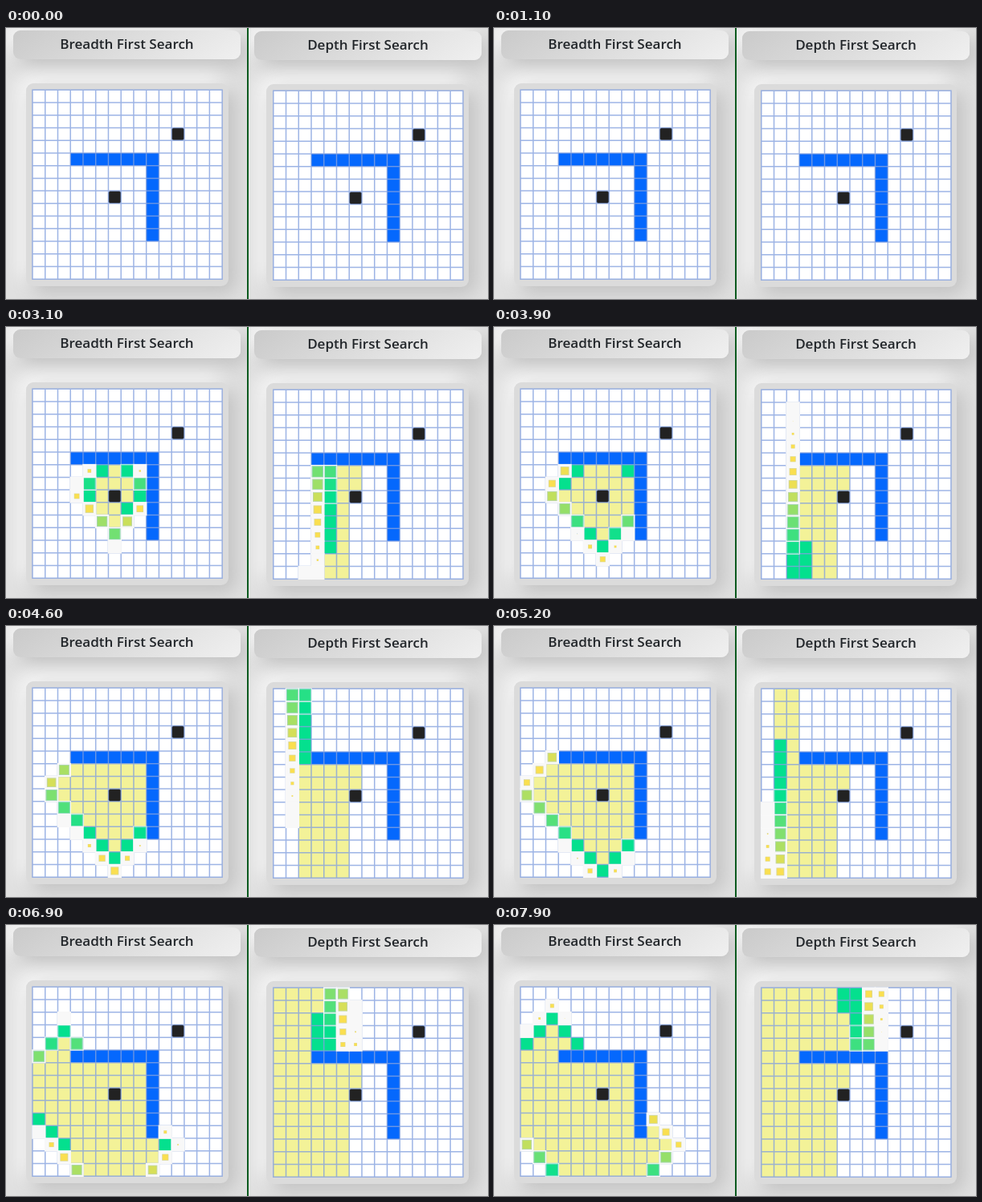
Write an HTML page with a canvas that moves like this. It is 600 px wide and 338 px high and loops after 8 s.

```html
<!DOCTYPE html>
<html lang="en">
<head>
<meta charset="utf-8">
<title>Breadth first and depth first search</title>
<style>
  html, body { margin: 0; width: 100%; height: 100%; overflow: hidden; }
  body { position: relative; background: #0b5a1e; }
  .panel { position: absolute; top: 0; height: 338px; overflow: hidden; background: #e0e0e0; }
  #left { left: 0; width: 300px; }
  #right { left: 302px; width: 298px; }
  h1, .board {
    position: absolute; margin: 0; border-radius: 9px;
    box-shadow: 8px 8px 24px #bebebe, -8px -8px 24px #fff;
  }
  h1 {
    left: 9px; top: 3px; width: 283px; height: 36px;
    background: linear-gradient(145deg, #cacaca, #f0f0f0);
    font: 600 17.05px/34px "Open Sans", "Noto Sans", sans-serif;
    text-align: center; color: #212529;
  }
  .board { left: 25px; top: 69px; width: 252px; height: 253px; background: #dbdbdb; }
  #right h1 { left: 7px; top: 4px; }
  #right .board { left: 22px; top: 70px; }
  canvas { position: absolute; left: 0; top: 0; }
</style>
</head>
<body>
<div class="panel" id="left"><h1>Breadth First Search</h1><div class="board"></div></div>
<div class="panel" id="right"><h1>Depth First Search</h1><div class="board"></div></div>
<canvas width="600" height="338"></canvas>
<script>
const ctx = document.querySelector('canvas').getContext('2d');
const SIZE = 15, CELL = 15.74, LOOP = 8000, TICK = 100;
const STEP = 60.6, VISIT = 1030;          // ms per visited cell, ms of one cell's animation
const START = [6, 8], GOAL = [11, 3];
const DIRS = [[0, -1], [0, 1], [-1, 0], [1, 0]];
const YELLOW = [250, 223, 80], TEAL = [4, 224, 142];
const LINE = 'rgba(125,155,220,0.75)', LINE_WIDTH = 1.5;

const clamp = v => Math.min(1, Math.max(0, v));
const isWall = (x, y) => (y === 5 && x >= 3 && x <= 9) || (x === 9 && y >= 5 && y <= 11);

// Returns a function that marks a cell as seen and tells whether it was free.
function makeClaim() {
  const seen = new Set();
  return (x, y) => {
    const key = y * SIZE + x;
    if (x < 0 || y < 0 || x >= SIZE || y >= SIZE || isWall(x, y) || seen.has(key)) return false;
    seen.add(key);
    return true;
  };
}

function breadthFirst() {
  const claim = makeClaim(), order = [START];
  claim(...START);
  for (const [x, y] of order)
    for (const [dx, dy] of DIRS)
      if (claim(x + dx, y + dy)) order.push([x + dx, y + dy]);
  return order;
}

function depthFirst() {
  const claim = makeClaim(), order = [];
  const visit = (x, y) => {
    if (!claim(x, y)) return;
    order.push([x, y]);
    for (const [dx, dy] of DIRS) visit(x + dx, y + dy);
  };
  visit(...START);
  return order;
}

const boards = [
  { x: 33, y: 77.2, begin: 1482, order: breadthFirst() },
  { x: 332.8, y: 78.2, begin: 1240, order: depthFirst() },
];

// Fills a square of the given size centred in a cell.
function fillCell(x, y, color, size = CELL) {
  const inset = (CELL - size) / 2;
  ctx.fillStyle = color;
  ctx.fillRect(x * CELL + inset, y * CELL + inset, size, size);
}

function drawLines() {
  const end = SIZE * CELL, over = LINE_WIDTH / 2;
  ctx.strokeStyle = LINE;
  ctx.lineWidth = LINE_WIDTH;
  ctx.beginPath();
  for (let i = 0; i <= SIZE; i++) {
    const p = i * CELL;
    ctx.moveTo(p, -over); ctx.lineTo(p, end + over);
    ctx.moveTo(-over, p); ctx.lineTo(end + over, p);
  }
  ctx.stroke();
}

function visitColor(age) {
  const k = clamp((age - 400) / 340);
  return `rgb(${YELLOW.map((c, i) => Math.round(c + (TEAL[i] - c) * k))})`;
}

const visitScale = age => Math.sin(Math.PI / 2 * clamp((age - 100) / 680));

function drawGrowing(x, y, age) {
  const s = visitScale(age), size = CELL * s, inset = (CELL - size + s) / 2;
  fillCell(x, y, '#f8f8f8', CELL + LINE_WIDTH);
  if (!s) return;
  fillCell(x, y, visitColor(age), size);
  ctx.strokeStyle = 'rgba(175,205,235,0.6)';
  ctx.lineWidth = s;
  ctx.strokeRect(x * CELL + inset, y * CELL + inset, size - s, size - s);
}

function drawEndpoint([x, y]) {
  ctx.fillStyle = '#222';
  ctx.beginPath();
  ctx.roundRect(x * CELL + 0.4, y * CELL + 0.4, 15, 15, 2);
  ctx.fill();
  ctx.strokeStyle = 'rgba(118,150,218,0.5)';
  ctx.lineWidth = 0.8;
  ctx.stroke();
}

function drawBoard({ x, y, begin, order }, time) {
  ctx.save();
  ctx.translate(x, y);
  ctx.fillStyle = '#fff';
  ctx.fillRect(0, 0, SIZE * CELL, SIZE * CELL);
  for (let row = 0; row < SIZE; row++)
    for (let col = 0; col < SIZE; col++)
      if (isWall(col, row)) fillCell(col, row, '#0568fd');

  const growing = [];
  order.forEach(([col, row], n) => {
    const age = time - begin - n * STEP;
    if (n === 0 || age < 0) return;
    if (age >= VISIT) fillCell(col, row, '#f3f298');
    else if (visitScale(age) === 1) fillCell(col, row, visitColor(age));
    else growing.push([col, row, age]);
  });
  drawLines();
  growing.forEach(cell => drawGrowing(...cell));
  drawEndpoint(START);
  drawEndpoint(GOAL);
  ctx.restore();
}

function frame() {
  const time = Math.floor(performance.now() % LOOP / TICK) * TICK;
  ctx.clearRect(0, 0, 600, 338);
  boards.forEach(board => drawBoard(board, time));
  requestAnimationFrame(frame);
}
frame();
</script>
</body>
</html>
```
